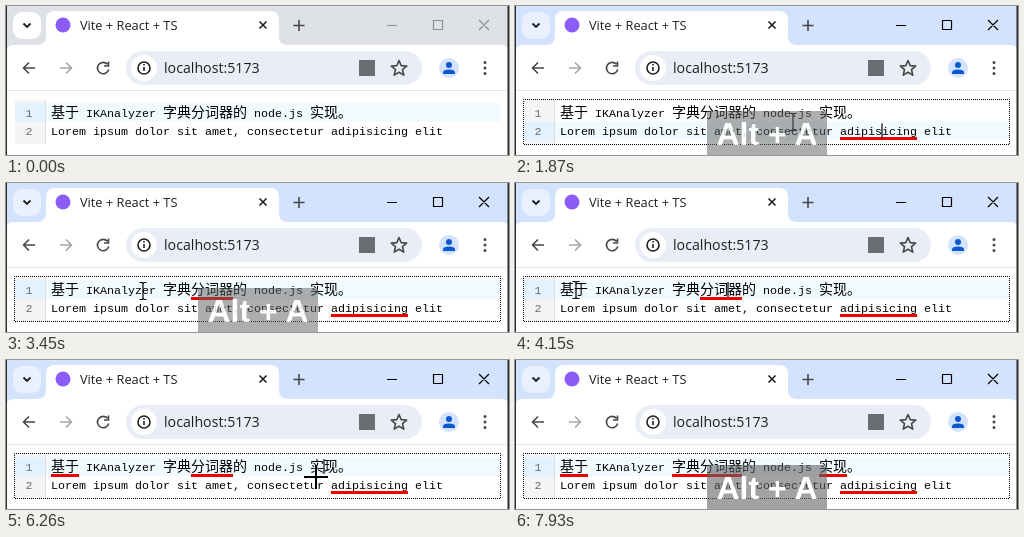
Recreate the animation shown at these times as an HTML page. Size 503x149 px, loop 8 s.

```html
<!DOCTYPE html>
<html lang="en">
<head>
<meta charset="utf-8">
<title>Editor word selection</title>
<style>
  html, body { margin: 0; width: 100%; height: 100%; overflow: hidden; background: #fff; }
  svg { display: block; width: 503px; height: 149px; }
  text { white-space: pre; }
  .ui { font-family: "Open Sans", "Noto Sans", sans-serif; fill: #1f1f1f; }
  .code { font: 11.667px "Liberation Mono", monospace; fill: #000; }
  .han { font: 14px "Noto Sans CJK SC", "Noto Sans CJK", sans-serif; fill: #000; }
  .num { fill: #6c6c6c; }
  .icon { fill: none; stroke: #474747; stroke-width: 1.6; }
  .dark { stroke: #1f1f1f; }
  .key { font: bold 32px "Liberation Sans", Arial, sans-serif; fill: #fff; }
</style>
</head>
<body>
<svg viewBox="0 0 503 149">
  <rect width="503" height="149" fill="#fff"/>

  <!-- tab strip -->
  <rect id="strip" width="503" height="50" fill="#d3e3fd"/>
  <rect id="search" x="7" y="6" width="28" height="27" rx="9" fill="#e9f1fe"/>
  <path class="icon dark" d="M17.500 17.500l3.500 3.500 3.500-3.500" style="stroke-width:1.900"/>
  <path d="M31 39q9 0 9-9V14q0-9 9-9H264q9 0 9 9V30q0 9 9 9z" fill="#fff"/>
  <circle cx="57" cy="19" r="7.500" fill="#8b5cf6"/>
  <text class="ui" x="74" y="23.500" font-size="12.800">Vite + React + TS</text>
  <path class="icon dark" d="M253.500 15.500l7 7m0-7l-7 7"/>
  <path class="icon" d="M287.500 19.500h11m-5.500-5.500v11"/>
  <path id="controls" d="M381 19.500h10M427.500 14.500h9v9h-9zM473 14l10 10m0-10l-10 10" fill="none" stroke-width="1.200"/>

  <!-- toolbar -->
  <path d="M0 85V47q0-8 8-8H495q8 0 8 8V85z" fill="#fff"/>
  <path class="icon" d="M29 62H17.500m5.500-5.500L17.500 62l5.500 5.500"/>
  <path class="icon" d="M54 62h11.500m-5.500-5.500l5.500 5.500-5.500 5.500" style="stroke:#a5a7aa"/>
  <path class="icon" d="M101.500 58.300a5.700 5.700 0 1 0 1.200 5.200M102.500 55.500v4.500h-4.500"/>
  <rect x="120" y="45" width="296" height="34" rx="17" fill="#e9eef6"/>
  <circle cx="138" cy="62" r="13" fill="#fff"/>
  <circle class="icon dark" cx="138" cy="62" r="6"/>
  <path class="icon dark" d="M138 61v4M138 58v1.600"/>
  <text class="ui" x="158" y="67" font-size="14.200">localhost:5173</text>
  <rect x="353" y="54" width="16" height="16" fill="#6a6d72"/>
  <path class="icon" stroke-linejoin="round" d="M393 54.500l2.200 5.100 5.500.500-4.200 3.600 1.300 5.400-4.800-2.900-4.800 2.900 1.300-5.400-4.200-3.600 5.500-.500z"/>
  <circle cx="443" cy="62" r="10" fill="#d3e3fd"/>
  <circle cx="443" cy="59" r="3" fill="#0b57d0"/>
  <path d="M437 68v-1.500q0-3 6-3t6 3V68z" fill="#0b57d0"/>
  <path d="M479 56.500v12" stroke="#474747" stroke-width="3" stroke-linecap="round" stroke-dasharray="0 5.500"/>
  <path d="M0 84.500h503" stroke="#e3e6ea"/>

  <!-- editor -->
  <rect x="9" y="94" width="30" height="44" fill="#f5f5f5"/>
  <path d="M39.500 94v44" stroke="#ddd"/>
  <g id="active">
    <rect x="9" y="97" width="30" height="19" fill="#e2f2ff"/>
    <rect x="40" y="97" width="454" height="19" fill="#f1fbff"/>
  </g>
  <text class="code num" x="19.500" y="111">1</text>
  <text class="code num" x="19.500" y="129">2</text>
  <g id="words"></g>
  <g id="marks" fill="#ee0000"></g>
  <rect id="border" x="8.500" y="93.500" width="486" height="45" fill="none" stroke="#000" stroke-dasharray="1" stroke-dashoffset=".5"/>
  <rect id="caret" width="1.200" height="15"/>

  <!-- window edges -->
  <path d="M0 0h1v149h-1zM501.500 0h1.500v149h-1.500z" fill="#2b2b2b"/>

  <g id="pointer">
    <path id="beam" d="M-3.500-8.500H-1L0-7.500 1-8.500H3.500M0-7.500V7.500M-3.500 8.500H-1L0 7.500 1 8.500H3.500" fill="none" stroke="#000" stroke-width="1.200"/>
    <g id="cross" fill="none">
      <path d="M-12 0H12M0-12V12" stroke="#fff" stroke-width="3"/>
      <path d="M-12 0H12M0-12V12" stroke="#000" stroke-width="2"/>
    </g>
  </g>
  <g id="hint">
    <rect x="192" y="105" width="120" height="44" fill="#646464" fill-opacity=".6"/>
    <text class="key" x="252" y="138.500" text-anchor="middle">Alt + A</text>
  </g>
</svg>
<script>
const LOOP = 8000, LEFT = 45, COL = 7;
const ALT_HOLD = 150, REST = 200, HINT = 960, BLINK = 600;
const lines = [
  '基于 IKAnalyzer 字典分词器的 node.js 实现。',
  'Lorem ipsum dolor sit amet, consectetur adipisicing elit'
];
const $ = id => document.getElementById(id);

function add(parent, tag, attrs, text = '') {
  const el = document.createElementNS('http://www.w3.org/2000/svg', tag);
  for (const k in attrs) el.setAttribute(k, attrs[k]);
  el.textContent = text;
  parent.appendChild(el);
  return el;
}

// Han characters take two columns, Latin ones a single column.
const isHan = ch => ch >= '\u3000';
const columns = s => [...s].reduce((n, ch) => n + (isHan(ch) ? 2 : 1), 0);

lines.forEach((line, i) => {
  for (const m of line.matchAll(/[\u3000-\u9fff]+|[!-~]+/g)) {
    const x = LEFT + columns(line.slice(0, m.index)) * COL;
    add($('words'), 'text', { x, y: 111 + 18 * i, class: isHan(m[0]) ? 'han' : 'code' }, m[0]);
  }
});

// Each step: move to x, y, click inside the word, then press the shortcut.
const steps = [
  { word: 'adipisicing', x: 365, y: 126, click: 460, key: 1390 },
  { word: '分词器', x: 213, y: 108, click: 2570, key: 2960 },
  { word: '基于', x: 58, y: 107, click: 4400, key: 4830 },
  { word: '实现', x: 310, y: 117, click: 6050, key: 6400 },
  { word: '字典', x: 172, y: 103, click: 7300, key: 7930 }
];
const entry = { x: 400, y: 148, key: -70 };

steps.forEach((s, i) => {
  s.from = steps[i - 1] || entry;
  s.start = s.from.key + REST;
  s.line = lines.findIndex(l => l.includes(s.word));
  const line = lines[s.line], width = columns(s.word);
  const left = LEFT + columns(line.slice(0, line.indexOf(s.word))) * COL;
  s.caret = left + 2 * Math.ceil(width / 4) * COL;
  s.mark = add($('marks'), 'rect', {
    x: left, y: 114 + 17 * s.line, width: width * COL, height: 3
  });
});

const show = (el, on) => el.setAttribute('visibility', on ? 'visible' : 'hidden');
const last = (time, t) => steps.filter(s => t >= s[time]).pop();

function drawPointer(t) {
  const s = last('start', t);
  const visible = s && t < s.key;
  const cross = visible && t >= s.key - ALT_HOLD;
  show($('beam'), visible && !cross);
  show($('cross'), cross);
  if (!visible) return;
  const u = Math.min(1, (t - s.start) / (s.click - s.start));
  const k = 1 - (1 - u) ** 2.5;
  const x = Math.round(s.from.x + (s.x - s.from.x) * k);
  const y = Math.round(s.from.y + (s.y - s.from.y) * k);
  $('pointer').setAttribute('transform', `translate(${x} ${y})`);
}

function draw(t) {
  const at = last('click', t), pressed = last('key', t);
  const row = at ? at.line : 0;
  $('strip').setAttribute('fill', at ? '#d3e3fd' : '#dee1e6');
  $('search').setAttribute('fill', at ? '#e9f1fe' : '#fff');
  $('controls').setAttribute('stroke', at ? '#000' : '#8b8f96');
  show($('border'), at);

  $('active').setAttribute('transform', `translate(0 ${row * 18.5})`);
  show($('caret'), at && (t - at.click) % (2 * BLINK) < BLINK);
  if (at) {
    $('caret').setAttribute('x', at.caret - 0.6);
    $('caret').setAttribute('y', 99 + row * 18.5);
  }
  for (const s of steps) show(s.mark, t >= s.key);
  drawPointer(t);

  const age = pressed ? (t - pressed.key) / HINT : 1;
  $('hint').setAttribute('opacity', Math.max(0, 1 - age ** 3));
}

const start = performance.now();
function tick() {
  draw((performance.now() - start) % LOOP);
  requestAnimationFrame(tick);
}
tick();
</script>
</body>
</html>
```
